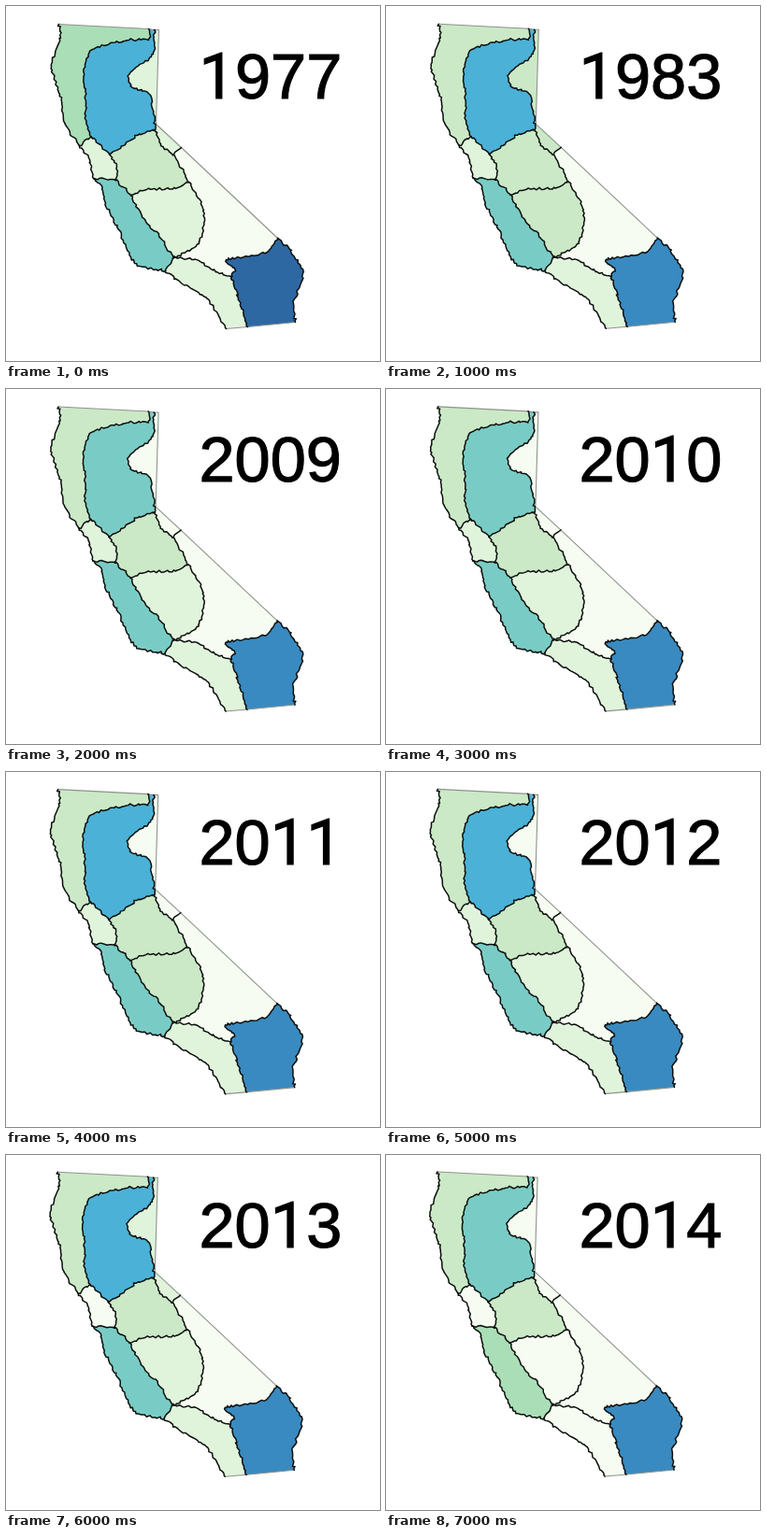
These frames come from a looping animation (400 px wide and 380 px high, 8000 ms). An HTML page:

```html
<!DOCTYPE html>
<html lang="en">
<head>
<meta charset="utf-8">
<title>Regions by year</title>
<style>
html, body { margin: 0; width: 100%; height: 100%; overflow: hidden; background: #fff; }
svg { display: block; width: 400px; height: 380px; }
path { fill: none; stroke-linejoin: round; stroke-linecap: round; }
.natural { stroke: #0b0f0d; stroke-width: 1.5; }
.ruled { stroke: #8d938c; stroke-width: 1.1; }
text { font: 68.5px "Liberation Sans", Arial, sans-serif; font-kerning: none; stroke: #000; stroke-width: 1.1; }
.plain { font-family: Roboto, sans-serif; }
</style>
</head>
<body>
<svg viewBox="0 0 400 380">
  <g id="map"></g>
  <text id="year" x="206.5" y="98.7"></text>
</svg>
<script>
const STEP = 1000;
const PALETTE = ['#f6fcf1', '#e0f3db', '#cbe9c6', '#aadeb6', '#79ccc5', '#4bb1d7', '#398ac0', '#2d68a3'];

// Junctions where borders meet
const nodes = {
  A: '56,19', B: '152,24', C: '158,25', D: '78,149', E: '91,140', F: '110,158',
  G: '159,132', H: '178,159', I: '187,151', J: '195,188', K: '117,186', L: '93,184',
  M: '133,202', N: '179,269', O: '170,283', P: '241,289', Q: '258,343', R: '290,248',
  S: '235,345', T: '309,338'
};

// Straight borders
const ruled = {
  northWest: 'A B',
  northMid: 'B C',
  northEast: 'C 163,25 160,126 I',
  diagonal: 'I R',
  southEast: 'T Q',
  southWest: 'Q S'
};

// Coasts, rivers and ridges: key points of a rough curve
const natural = {
  coastNorth: 'A 58,34 48,64 57,94 64,128 D',
  coastBay: 'D 88,162 L',
  coastCentral: 'L 102,192 106,211 120,239 137,275 O',
  coastSouth: 'O 188,297 215,313 S',
  river: 'R 303,260 317,286 307,318 T',
  northSac: 'B 152,35 131,36 92,46 83,72 85,102 84,120 E',
  northBay: 'E 84,143 D',
  sacEast: 'C 157,51 131,73 135,87 152,93 157,114 G',
  sacBay: 'E F',
  sacJoaquin: 'F 125,149 140,138 G',
  ridge: 'G 165,147 H',
  spur: 'H I',
  joaquinEast: 'H 187,173 J',
  bayJoaquin: 'F 118,171 K',
  bayCentral: 'K L',
  centralJoaquin: 'K M',
  joaquinTulare: 'M 150,196 183,194 J',
  tulareWest: 'M 147,227 163,245 N',
  tulareEast: 'J 211,218 206,254 N',
  centralSouth: 'N O',
  southNorth: 'N 200,271 225,284 P',
  desertNorth: 'R 279,263 235,271 244,280 P',
  desertWest: 'P 248,312 Q'
};

// Boundary loops; a leading minus walks the border backwards
const regions = [
  'northWest northSac northBay -coastNorth',
  'northMid sacEast -sacJoaquin -sacBay -northSac',
  'northEast -spur -ridge -sacEast',
  'coastBay -bayCentral -bayJoaquin -sacBay northBay',
  'sacJoaquin ridge joaquinEast -joaquinTulare -centralJoaquin -bayJoaquin',
  'coastCentral -centralSouth -tulareWest -centralJoaquin bayCentral',
  'joaquinTulare tulareEast -tulareWest',
  'spur diagonal desertNorth -southNorth -tulareEast -joaquinEast',
  'coastSouth -southWest -desertWest -southNorth centralSouth',
  'river southEast -desertWest -desertNorth'
];

// One palette digit per region
const years = {
  1977: '3511241017',
  1983: '2521242016',
  2009: '2401241016',
  2010: '2401241016',
  2011: '2501242016',
  2012: '2501241016',
  2013: '2510241016',
  2014: '2400230006'
};

let seed = 29;
const wobble = size => {
  seed = (seed * 16807) % 2147483647;
  return (seed / 2147483647 - .5) * size;
};

const parse = line => line.split(' ').map(spot => (nodes[spot] || spot).split(',').map(Number));

// Cardinal spline between b and c, with a little slack in the tangents
function curve(a, b, c, d, u) {
  const pull = .35, u2 = u * u, u3 = u2 * u;
  return b + (3 * u2 - 2 * u3) * (c - b)
    + pull * ((u3 - 2 * u2 + u) * (c - a) + (u3 - u2) * (d - b));
}

function roughen(points) {
  const out = [points[0]];
  for (let i = 1; i < points.length; i++) {
    const b = points[i - 1], c = points[i];
    const a = points[i - 2] || b, d = points[i + 1] || c;
    const parts = Math.ceil(Math.hypot(c[0] - b[0], c[1] - b[1]) / 2.5);
    for (let k = 1; k < parts; k++) {
      out.push([0, 1].map(n => curve(a[n], b[n], c[n], d[n], k / parts) + wobble(2.6)));
    }
    out.push(c);
  }
  return out;
}

const borders = {};
for (const name in ruled) borders[name] = parse(ruled[name]);
for (const name in natural) borders[name] = roughen(parse(natural[name]));

const map = document.getElementById('map');
const label = document.getElementById('year');

function addPath(points, className) {
  const path = document.createElementNS('http://www.w3.org/2000/svg', 'path');
  path.setAttribute('d', 'M' + points.map(p => p.map(v => v.toFixed(1)).join(' ')).join('L'));
  path.setAttribute('class', className);
  map.append(path);
  return path;
}

const walk = name => name[0] === '-' ? [...borders[name.slice(1)]].reverse() : borders[name];
const areas = regions.map(loop => addPath(loop.split(' ').flatMap(walk), 'area'));
for (const name in ruled) addPath(borders[name], 'ruled');
for (const name in natural) addPath(borders[name], 'natural');

const scenes = Object.entries(years);
let shown = -1;
function show(index) {
  if (index === shown) return;
  shown = index;
  const [year, shades] = scenes[index];
  // The numeral one has no foot
  label.innerHTML = year.replace(/1/g, '<tspan class="plain">1</tspan>');
  areas.forEach((area, i) => { area.style.fill = PALETTE[shades[i]]; });
  map.setAttribute('transform', `translate(${.5 - .2 * index} ${.5 - .22 * index})`);
}

const start = performance.now();
function tick() {
  show(Math.floor((performance.now() - start) / STEP) % scenes.length);
  requestAnimationFrame(tick);
}
tick();
</script>
</body>
</html>
```
